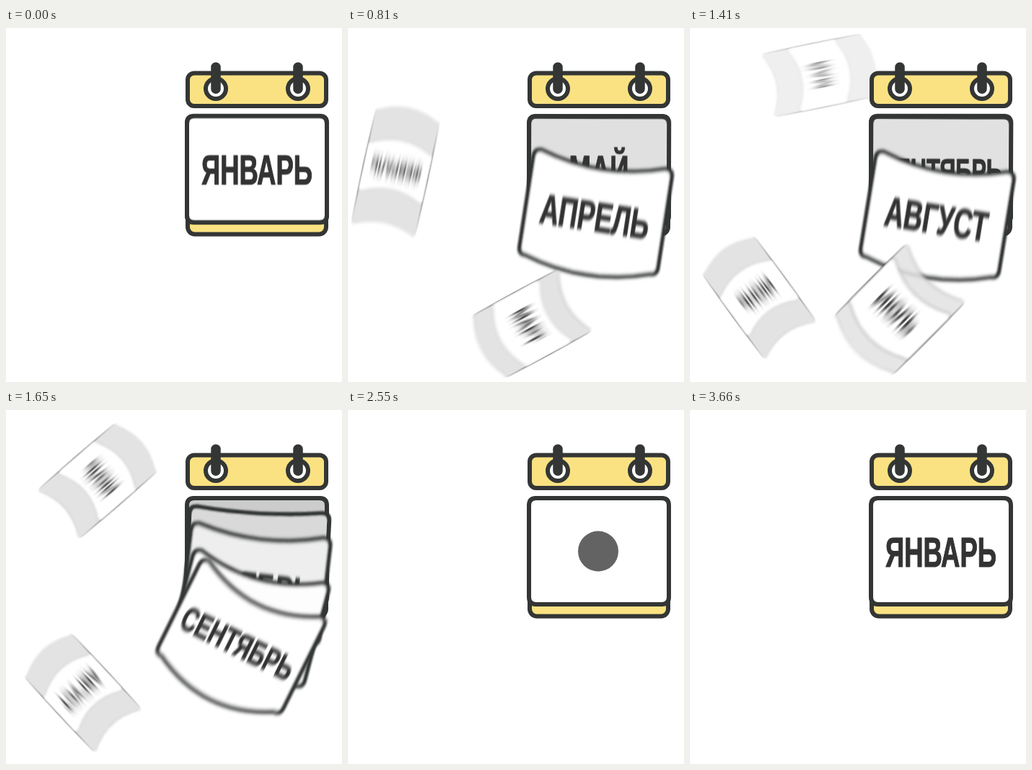
Animation, 466 px wide and 490 px high, one loop 4380 ms. Source, as an HTML page:

```html
<!DOCTYPE html>
<html lang="ru">
<head>
<meta charset="utf-8">
<title>Календарь</title>
<style>
html, body { margin: 0; width: 100%; height: 100%; overflow: hidden; background: #fff; }
svg { display: block; width: 466px; height: 490px; }
text { font: bold 57px "Liberation Sans", Arial, sans-serif; text-anchor: middle; fill: #333; stroke: #333; stroke-width: 1.2; stroke-linejoin: round; }
text.long { font-size: 48px; }
.line { stroke: #333634; stroke-width: 6; stroke-linejoin: round; }
.yellow { fill: #fae283; }
</style>
</head>
<body>
<svg viewBox="0 0 466 490" id="stage">
  <defs id="defs">
    <linearGradient id="fade" gradientUnits="userSpaceOnUse" x1="0" y1="-170" x2="0" y2="170">
      <stop offset="0" stop-color="#333" stop-opacity="0"/>
      <stop offset=".5" stop-color="#333" stop-opacity=".75"/>
      <stop offset="1" stop-color="#333" stop-opacity="0"/>
    </linearGradient>
  </defs>
  <rect class="line yellow" x="252" y="122" width="192" height="163.5" rx="10"/>
  <g id="last" transform="translate(348 195.5)">
    <path class="line" id="lastPaper"/>
    <circle id="mark" cx="-1" cy="0" r="28" fill="#333"/>
    <g id="first"></g>
  </g>
  <g id="pages"></g>
  <rect class="line yellow" x="252" y="62.5" width="192" height="45.5" rx="9"/>
  <g id="rings"></g>
</svg>
<script>
const LOOP = 4380, SETTLED = 2040, LIFE = 700;
const W = 97, H = 73.5, R = 10;
const months = ["ЯНВАРЬ", "ФЕВРАЛЬ", "МАРТ", "АПРЕЛЬ", "МАЙ", "ИЮНЬ", "ИЮЛЬ",
  "АВГУСТ", "СЕНТЯБРЬ", "ОКТЯБРЬ", "НОЯБРЬ", "ДЕКАБРЬ"];
const starts = [0, 231, 404, 576, 749, 921, 1030, 1173, 1340, 1385, 1431, 1485];

// age, x, y, turn, scale, curl, smear, blur
const path = [
  [0, 348, 195.5, 0, 1, 0, 0, 0],
  [110, 348, 199, 0.8, 1, 1, 0, 0.5],
  [165, 348, 211, 3, 1, 5, 0, 1.2],
  [219, 346, 239, 6.5, 1, 12, 0, 2],
  [265, 337, 287, 14.5, 1, 18, 0, 2.2],
  [310, 327, 312, 26, 1, 24, 0, 2.5],
  [391, 280, 398, 50, 0.55, 24, 50, 13],
  [450, 161, 422, 105, 0.46, 24, 80, 15],
  [477, 108, 394, 136, 0.46, 24, 80, 15],
  [564, 55, 240, 180, 0.47, 22, 105, 16],
  [620, 125, 100, 228, 0.46, 24, 80, 15],
  [700, 225, 48, 285, 0.46, 24, 80, 15]
];

const $ = id => document.getElementById(id);
const clamp = v => Math.min(1, Math.max(0, v));
const smooth = v => { v = clamp(v); return v * v * (3 - 2 * v); };

function add(parent, tag, attrs) {
  const el = document.createElementNS("http://www.w3.org/2000/svg", tag);
  set(el, attrs);
  parent.appendChild(el);
  return el;
}

function set(el, attrs) {
  for (const k in attrs) el.setAttribute(k, attrs[k]);
}

function sheet(h, c) {
  const x = W - R;
  return `M${-x} ${-h}Q0 ${-h + 2 * c} ${x} ${-h}Q${W} ${-h} ${W} ${-h + R}V${h - R}` +
    `Q${W} ${h} ${x} ${h}Q0 ${h + 2 * c} ${-x} ${h}Q${-W} ${h} ${-W} ${h - R}V${-h + R}Q${-W} ${-h} ${-x} ${-h}Z`;
}

function word(parent, name) {
  const long = name.length > 6;
  const el = add(parent, "text", { class: long ? "long" : "", y: long ? 18 : 21, transform: "scale(.64 1)" });
  el.textContent = name;
  return el;
}

function blurFilter(id) {
  const f = add($("defs"), "filter", { id, filterUnits: "userSpaceOnUse", x: -150, y: -280, width: 300, height: 560 });
  return add(f, "feGaussianBlur", { stdDeviation: "0 0" });
}

function makePage(name, i) {
  const root = add($("pages"), "g", {});
  const body = add(root, "g", { filter: `url(#soft${i})` });
  const label = add(root, "g", { filter: `url(#streak${i})` });
  word(label, name);
  return {
    root, label,
    trail: add(body, "path", { fill: "#e3e3e3", stroke: "url(#fade)", "stroke-width": 4 }),
    paper: add(body, "path", {}),
    edge: add(body, "path", { class: "line", fill: "none" }),
    soft: blurFilter("soft" + i),
    streak: blurFilter("streak" + i)
  };
}

function slope(i, k) {
  if (i === 0) return 0;
  const a = path[i - 1], b = path[Math.min(i + 1, path.length - 1)];
  return (b[k] - a[k]) / (b[0] - a[0]);
}

function pose(age) {
  let i = 0;
  while (i < path.length - 2 && age > path[i + 1][0]) i++;
  const a = path[i], b = path[i + 1], d = b[0] - a[0];
  const u = clamp((age - a[0]) / d), v = 1 - u;
  return a.slice(1).map((p, j) => {
    const k = j + 1;
    return p * v * v * (1 + 2 * u) + b[k] * u * u * (3 - 2 * u) +
      d * u * v * (v * slope(i, k) - u * slope(i + 1, k));
  });
}

// Paper lies in the shade until the sheet above has gone.
function shade(aboveAge) {
  const c = Math.round(204 + 51 * smooth((aboveAge - 165) / 165));
  return `rgb(${c},${c},${c})`;
}

function drawPage(p, age, above) {
  const shown = above > 0 && age < LIFE;
  p.root.style.display = shown ? "" : "none";
  if (!shown) return;
  const [x, y, turn, scale, curl, smear, blur] = pose(age);
  const e = Math.max(0, smear), s = clamp(e / 50), b = Math.max(0, blur);
  set(p.root, {
    transform: `translate(${x} ${y}) rotate(${turn}) scale(${scale})`,
    opacity: 1 - smooth((age - 630) / 70)
  });
  set(p.trail, { d: sheet(H + e, curl), opacity: s });
  set(p.paper, { d: sheet(H, curl), fill: shade(above) });
  set(p.edge, { d: sheet(H, curl), opacity: 1 - 0.92 * s });
  set(p.label, { transform: `translate(0 ${curl * 0.4})` });
  set(p.soft, { stdDeviation: `${Math.min(b * 0.4, 1)} ${Math.min(b, 4)}` });
  set(p.streak, { stdDeviation: `${Math.min(b * 0.3, 1)} ${b}` });
}

function draw(t) {
  const clock = t < SETTLED ? t + 0.6 * Math.max(0, t - 1650) : 1e5;
  const age = i => i < 0 ? LIFE : clock - starts[i];
  pages.forEach((p, i) => drawPage(p, age(i), age(i - 1)));
  set($("lastPaper"), { fill: shade(age(11)) });
  $("last").style.display = age(11) > 0 ? "" : "none";
  set($("mark"), { opacity: 1 - clamp((t - 2430) / 510) });
  const grow = smooth((t - 2790) / 870);
  $("first").style.display = grow > 0 ? "" : "none";
  set($("first"), { transform: `scale(${grow})` });
}

$("lastPaper").setAttribute("d", sheet(H, 0));
word($("first"), months[0]);
for (const x of [291, 405]) {
  add($("rings"), "circle", { class: "line", cx: x, cy: 84, r: 14, fill: "#fff" });
  add($("rings"), "rect", { x: x - 6.75, y: 47.5, width: 13.5, height: 43.5, rx: 6.5, fill: "#333634" });
}
const pages = months.map(makePage);
pages.slice().reverse().forEach(p => $("pages").appendChild(p.root));

const began = performance.now();
function tick() {
  draw((performance.now() - began) % LOOP);
  requestAnimationFrame(tick);
}
draw(0);
requestAnimationFrame(tick);
</script>
</body>
</html>
```
